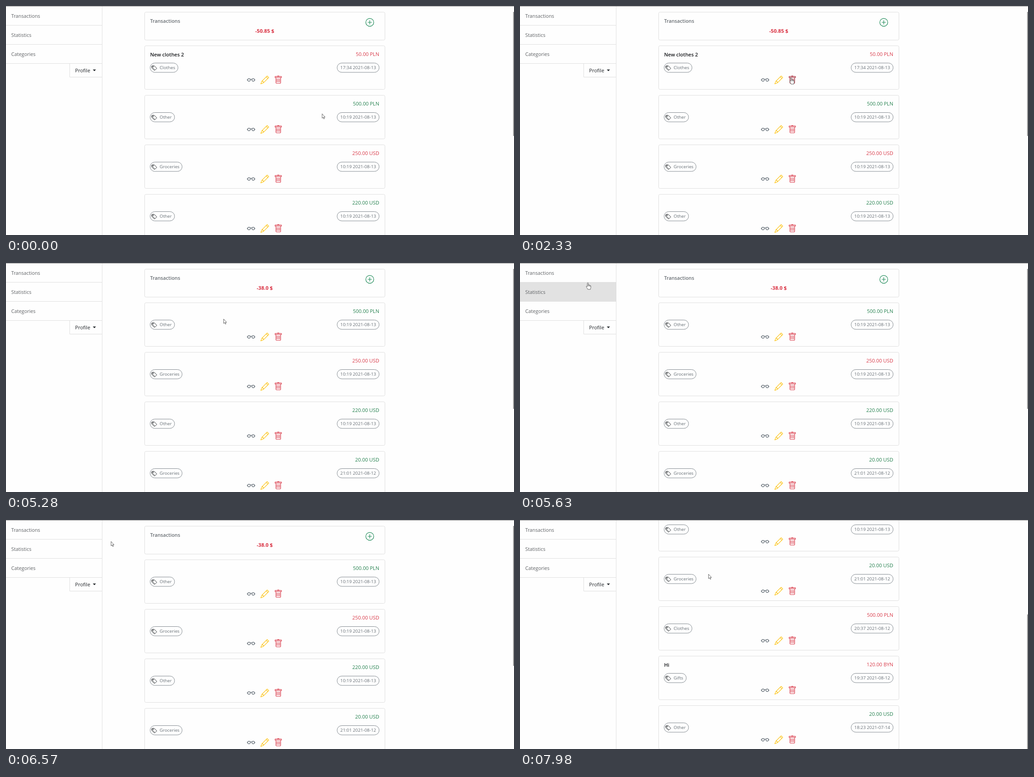
An HTML page for the animation above (8000 ms loop, 1112 px wide and 504 px high).

```html
<!DOCTYPE html>
<html lang="en">
<head>
<meta charset="utf-8">
<title>Transactions</title>
<style>
  html, body { margin: 0; width: 100%; height: 100%; overflow: hidden; background: #fefefe; }
  svg { display: block; width: 1112px; height: 504px; font: 10.75px "Open Sans", "Noto Sans", sans-serif; }
  .line { fill: none; stroke: #dfdfdf; }
  .nav { fill: #5f6265; }
  .pill { fill: none; stroke: #757d84; stroke-width: .9; }
  .small { font-size: 9.75px; fill: #666e75; }
  .amount { font-size: 10.95px; text-anchor: end; }
  .heading { font-weight: 600; fill: #666c71; }
  .title { font-size: 11px; font-weight: 600; fill: #17191c; }
  .total { font-size: 11.2px; font-weight: 700; fill: #d92f40; text-anchor: middle; }
  .icon { fill: none; stroke: currentColor; stroke-linejoin: round; stroke-linecap: round; }
  .cursor { fill: #fff; stroke: #333; stroke-width: .75; stroke-linejoin: round; }
</style>
</head>
<body>
<svg viewBox="0 0 1112 504">
  <defs>
    <g id="tags" class="icon" stroke-width="1.2">
      <path d="M2.5 1.5H7.6L15 9l-5 5-7.5-7.4ZM.5 2.8V7.6l7.3 7.3.9-.2"/><circle cx="5" cy="4.3" r=".9"/>
    </g>
    <g id="glasses" class="icon">
      <circle cx="4" cy="8" r="2.5"/><circle cx="12" cy="8" r="2.5"/>
      <path d="M6.5 8a1.5 1.5 0 0 1 3 0M.5 8h1M14.5 8h1"/>
    </g>
    <g id="pencil" class="icon">
      <path d="M12.5.5l3 3-10 10-5 2 2-5ZM10.9 2.5l2.6 2.6M2.9 10.5H4.5v1h1v1.6"/>
    </g>
    <g id="trash" class="icon">
      <path d="M3.5 4v9A1.5 1.5 0 0 0 5 14.5h6a1.5 1.5 0 0 0 1.5-1.5V4M2 1.5H14v2H2ZM6.4 1.2 6.8.5H9.2l.4.7M5.5 6v6M8 6v6M10.5 6v6"/>
    </g>
    <g id="plus" class="icon">
      <circle cx="8" cy="8" r="7.5"/><path d="M8 4.5v7M4.5 8h7"/>
    </g>
  </defs>

  <g id="page"></g>

  <rect id="hover" width="210" height="42" fill="#e2e2e2"/>
  <path class="line" d="M210.5 1V504M0 42.5H210M0 84.5H210M0 126.5H210M139.5 126V156.5H210"/>
  <g class="nav">
    <text x="11.5" y="26">Transactions</text>
    <text x="11.5" y="67.7">Statistics</text>
    <text x="11.5" y="109.8">Categories</text>
  </g>
  <text x="151.3" y="145.8" font-size="11" fill="#212529">Profile</text>
  <path d="M190 139.8h7l-3.5 3.7Z" fill="#212529"/>
  <path d="M0 .5H1112" stroke="#8b8b8b"/>
  <rect id="thumb" x="1110" width="2" fill="#9c9c9c"/>
  <path id="arrow" class="cursor" d="M0 .3V10L2.2 8 3.7 11.5 5.2 10.8 3.7 7.5H6.5Z"/>
  <path id="hand" class="cursor" d="M-1.1 8.5V1.1a1.1 1.1 0 0 1 2.2 0V5.4a1 1 0 0 1 2 0v.5a1 1 0 0 1 1.9.2v.6a.8.8 0 0 1 1.5.3V10.5c0 1-.8 2-.8 4H-.2C-.4 12.5-3 10.5-3.4 8.3c.2-1.2 1.3-.9 2.3.2ZM1.1 5.4V8M3.1 5.9V8M5 6.7V8.2"/>
</svg>
<script>
const LOOP = 8000, DELETED_AT = 4600;
const RED = '#d93a49', GREEN = '#25814f';
const byId = id => document.getElementById(id);

// amount, colour, category, date, title
const items = [
  ['50.00 PLN', RED, 'Clothes', '17:34 2021-08-13', 'New clothes 2'],
  ['500.00 PLN', GREEN, 'Other', '10:19 2021-08-13'],
  ['250.00 USD', RED, 'Groceries', '10:19 2021-08-13'],
  ['220.00 USD', GREEN, 'Other', '10:19 2021-08-13'],
  ['20.00 USD', GREEN, 'Groceries', '21:01 2021-08-12'],
  ['500.00 PLN', RED, 'Clothes', '20:37 2021-08-12'],
  ['120.00 BYN', RED, 'Gifts', '19:37 2021-08-12', 'Hi'],
  ['20.00 USD', GREEN, 'Other', '18:23 2021-07-14'],
];
const pillWidth = { Clothes: 61, Other: 53.5, Groceries: 70, Gifts: 48.5 };

const icon = (name, x, y, color, scale = 1.16) =>
  `<use href="#${name}" color="${color}" transform="translate(${x} ${y}) scale(${scale}) translate(-8 -8)"/>`;
const box = (y, height) =>
  `<rect class="line" x="303.5" y="${y}" width="526" height="${height}" rx="3"/>`;
const pill = (x, width) =>
  `<rect class="pill" x="${x}" y="38.5" width="${width}" height="20.5" rx="10.2"/>`;

const card = ([amount, color, category, date, title = ''], i) => `
  <g transform="translate(0 ${87 + i * 109})">
    ${box(.5, 96)}
    <text class="title" x="315.5" y="23.8">${title}</text>
    <text class="amount" x="817" y="22.6" fill="${color}">${amount}</text>
    ${pill(315.5, pillWidth[category])}${pill(724.8, 92)}
    ${icon('tags', 324.7, 49.4, '#212529', .77)}
    <text class="small" x="336.3" y="52.3">${category}</text>
    <text class="small" x="771" y="52.3" text-anchor="middle">${date}</text>
    ${icon('glasses', 536.5, 75.7, '#5f6972')}
    ${icon('pencil', 566.4, 75.7, '#fcc419')}
    <g class="trash">${icon('trash', 596, 75.7, 'inherit')}</g>
  </g>`;

const list = (id, total, rows) => `
  <g id="${id}" color="${RED}">
    ${box(13.5, 61.5)}
    <text class="heading" x="315.5" y="37">Transactions</text>
    <text class="total" x="566.3" y="58.6">${total}</text>
    ${icon('plus', 796.3, 36, '#198754')}
    ${rows.map(card).join('')}
  </g>`;

const page = byId('page');
page.innerHTML = list('before', '-50.85 $', items) + list('after', '-38.0 $', items.slice(1));
const firstTrash = ['before', 'after'].map(id => byId(id).querySelector('.trash'));

// time, x, y
const pointer = [
  [0, 692, 237], [60, 692, 237], [210, 692, 202], [1670, 692, 202],
  [1850, 665, 185], [2150, 603, 160], [2330, 593.5, 157.5],
  [4470, 593.5, 157.5], [4500, 594.5, 157.5], [5100, 594.5, 157.5],
  [5240, 525, 136], [5430, 300, 76], [5630, 148.5, 43.5], [5690, 148.5, 43.5], [5720, 125, 27],
  [6370, 125, 27], [6570, 230, 47], [6600, 230, 47], [6800, 350, 92], [7020, 414, 119],
  [7960, 414, 119], [7980, 412.7, 119],
];
// time, offset; each offset holds until the next
const scroll = [
  [0, 0], [7210, 2], [7280, 8], [7350, 21], [7430, 120], [7480, 220], [7540, 305], [7590, 333],
];

function sample(track, t) {
  const next = track.findIndex(step => step[0] > t);
  if (next < 0) return track[track.length - 1].slice(1);
  const [t0, ...from] = track[next - 1], [t1, ...to] = track[next];
  const k = (t - t0) / (t1 - t0);
  return from.map((v, i) => v + (to[i] - v) * k);
}
const hold = (track, t) => track.filter(step => step[0] <= t).pop()[1];

const show = (el, on) => el.setAttribute('visibility', on ? 'visible' : 'hidden');

function draw(t) {
  const [x, y] = sample(pointer, t);
  const offset = hold(scroll, t);
  const deleted = t >= DELETED_AT;
  const onTrash = x > 586 && x < 605 && y > 152 && y < 173;
  const onNav = x < 210 && y < 126;

  show(byId('before'), !deleted);
  show(byId('after'), deleted);
  page.setAttribute('transform', `translate(0 ${-offset})`);
  for (const el of firstTrash) el.setAttribute('color', onTrash ? '#a3202f' : RED);

  show(byId('hover'), onNav);
  byId('hover').setAttribute('y', Math.floor(y / 42) * 42 + 1);

  byId('thumb').setAttribute('y', 13 + offset * .585);
  byId('thumb').setAttribute('height', deleted ? 308 : 273);

  for (const [id, on] of [['hand', onTrash || onNav], ['arrow', !onTrash && !onNav]]) {
    show(byId(id), on);
    byId(id).setAttribute('transform', `translate(${x} ${y})`);
  }
}

const start = performance.now();
function tick() {
  draw(Math.max(0, performance.now() - start) % LOOP);
  requestAnimationFrame(tick);
}
tick();
</script>
</body>
</html>
```
